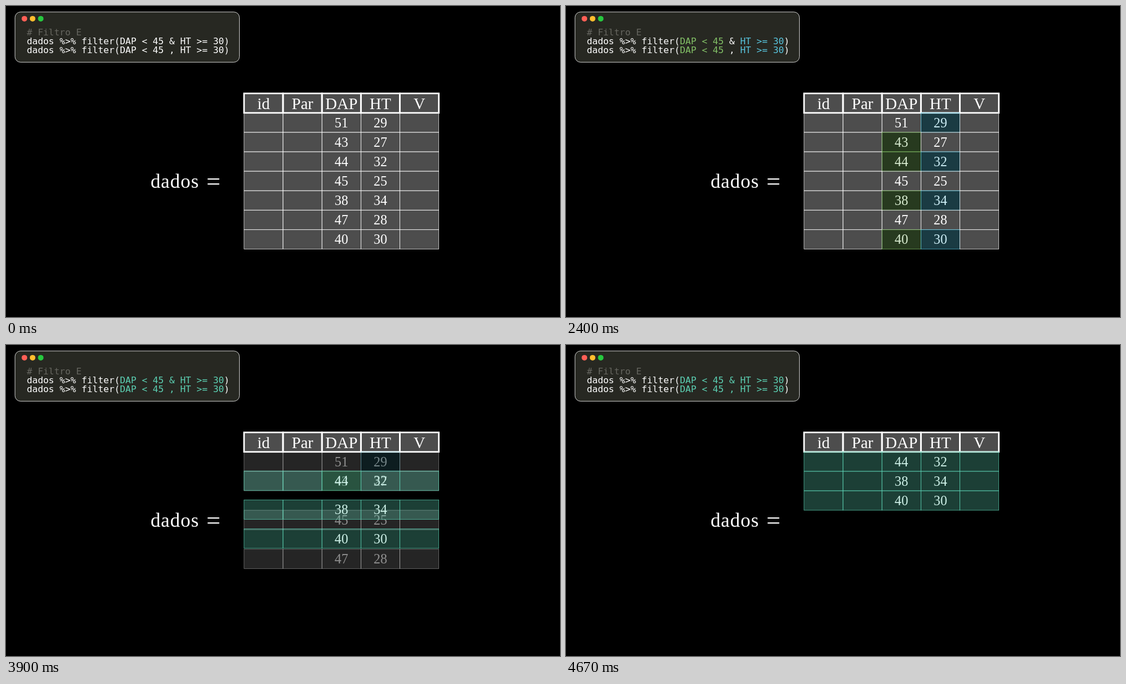
Write an HTML page with a canvas that moves like this. It is 998 px wide and 561 px high and loops after 5410 ms.

```html
<!DOCTYPE html>
<html lang="pt">
<head>
<meta charset="utf-8">
<title>dados filter</title>
<style>
html, body { margin: 0; width: 100%; height: 100%; overflow: hidden; background: #000; }
canvas { display: block; }
</style>
</head>
<body>
<canvas id="stage" width="998" height="561"></canvas>
<script>
const ctx = document.getElementById('stage').getContext('2d');
const LOOP = 5410, STEP = 1000, START = 397;
const UNIT = 998 / (128 / 9);
const CELL_W = UNIT, CELL_H = UNIT / 2;
const LEFT = 499 - UNIT, TOP = 280.5 - 1.75 * UNIT;
const SERIF = '"Liberation Serif", "Times New Roman", serif';
const MONO = '"DejaVu Sans Mono", monospace';
const WHITE = [255, 255, 255], GREEN = [131, 193, 103];
const BLUE = [88, 196, 221], TEAL = [92, 208, 179];

const HEAD = ['id', 'Par', 'DAP', 'HT', 'V'];
const ROWS = [
  { dap: 51, ht: 29, blue: true },
  { dap: 43, ht: 27, green: true },
  { dap: 44, ht: 32, green: true, blue: true, slot: 0 },
  { dap: 45, ht: 25 },
  { dap: 38, ht: 34, green: true, blue: true, slot: 1 },
  { dap: 47, ht: 28 },
  { dap: 40, ht: 30, green: true, blue: true, slot: 2 }
].map((row, i) => ({ ...row, index: i, kept: row.slot !== undefined }));

const sigmoid = x => 1 / (1 + Math.exp(-x));

// Sigmoid ease, normalised to run from 0 to 1
function smooth(t) {
  const edge = sigmoid(-5);
  const p = Math.min(1, Math.max(0, t));
  return Math.min(1, Math.max(0, (sigmoid(10 * (p - 0.5)) - edge) / (1 - 2 * edge)));
}

const progress = (time, step) => smooth((time - START - step * STEP) / STEP);
const mix = (a, b, p) => a.map((v, i) => v + (b[i] - v) * p);
const rgba = (c, a = 1) => `rgba(${c.map(Math.round).join(',')},${a})`;

function text(str, x, y, font, color, align = 'left', spacing = 0) {
  ctx.font = font;
  ctx.textAlign = align;
  ctx.letterSpacing = `${spacing}px`;
  ctx.fillStyle = color;
  ctx.fillText(str, x, y);
}

function dot(x, y, r, color) {
  ctx.fillStyle = color;
  ctx.beginPath();
  ctx.arc(x, y, r, 0, Math.PI * 2);
  ctx.fill();
}

function cell(col, y, color, alpha, line) {
  const x = LEFT + col * CELL_W;
  ctx.fillStyle = rgba(color, 0.3 * alpha);
  ctx.fillRect(x, y, CELL_W, CELL_H);
  ctx.strokeStyle = rgba(color, alpha);
  ctx.lineWidth = line;
  ctx.strokeRect(x, y, CELL_W, CELL_H);
}

const centre = col => LEFT + (col + 0.5) * CELL_W;

function drawCode(dapColor, htColor, joinColor) {
  ctx.beginPath();
  ctx.roundRect(16.2, 10.8, 404.3, 90.6, 10);
  ctx.fillStyle = '#272822';
  ctx.fill();
  ctx.strokeStyle = '#fff';
  ctx.lineWidth = 0.8;
  ctx.stroke();
  ['#ff5f56', '#ffbd2e', '#27c93f'].forEach((c, i) => dot(33.2 + 14.7 * i, 22.9, 5, c));

  const font = `16.4px ${MONO}`, x = 37.4;
  text('# Filtro E', x, 53, font, '#666660');
  const advance = ctx.measureText('0').width;
  ['&', ','].forEach((join, i) => {
    const parts = [
      ['dados %>% filter(', WHITE], ['DAP < 45', dapColor],
      [` ${join} `, joinColor], ['HT >= 30', htColor], [')', WHITE]
    ];
    let pos = 0;
    for (const [str, color] of parts) {
      text(str, x + pos * advance, 69 + 16 * i, font, rgba(color));
      pos += str.length;
    }
  });
}

function drawHeader() {
  HEAD.forEach((name, col) => {
    cell(col, TOP, WHITE, 1, 2.8);
    text(name, centre(col), TOP + 28, `29px ${SERIF}`, '#fff', 'center');
  });
}

function drawRow(row, green, blue, teal, move) {
  const slot = row.kept ? row.index + (row.slot - row.index) * move : row.index;
  const y = TOP + (slot + 1) * CELL_H;
  const alpha = row.kept ? 1 : 1 - move;
  if (alpha <= 0) return;
  const font = `24.3px ${SERIF}`;
  text(row.dap, centre(2), y + 26, font, rgba(WHITE, alpha), 'center');
  text(row.ht, centre(3), y + 26, font, rgba(WHITE, alpha), 'center');
  for (let col = 0; col < HEAD.length; col++) {
    let color = WHITE;
    if (col === 2 && row.green) color = green;
    if (col === 3 && row.blue) color = blue;
    if (row.kept) color = mix(color, TEAL, teal);
    cell(col, y, color, alpha, 0.7);
  }
}

function draw(time) {
  const green = mix(WHITE, GREEN, progress(time, 0));
  const blue = mix(WHITE, BLUE, progress(time, 1));
  const teal = progress(time, 2);
  const move = progress(time, 3);

  ctx.fillStyle = '#000';
  ctx.fillRect(0, 0, 998, 561);
  drawCode(mix(green, TEAL, teal), mix(blue, TEAL, teal), mix(WHITE, TEAL, teal));
  text('dados', 260.4, 328.3, `35.4px ${SERIF}`, '#fff', 'left', 1);
  text('=', 373.8, 330.5, `45px ${SERIF}`, '#fff', 'center');
  drawHeader();

  // Moving rows pass over the fading ones
  const order = move > 0 ? [...ROWS].sort((a, b) => a.kept - b.kept) : ROWS;
  for (const row of order) drawRow(row, green, blue, teal, move);
}

ctx.fontKerning = 'none';
const begin = performance.now();
function tick() {
  draw((performance.now() - begin) % LOOP);
  requestAnimationFrame(tick);
}
tick();
</script>
</body>
</html>
```
